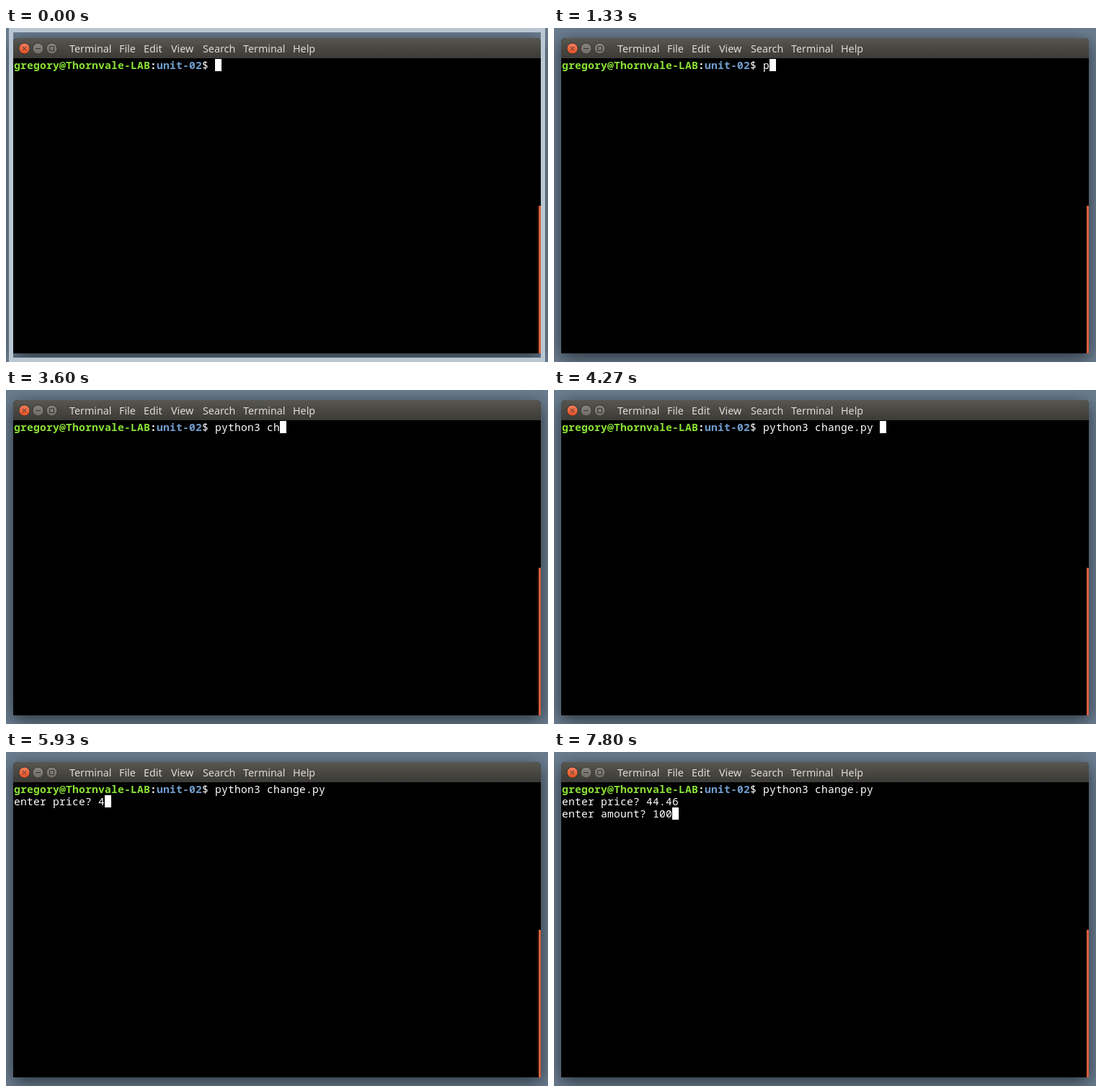
An HTML page with a canvas for the animation above (8 s loop, 752 by 464 pixels).

```html
<!DOCTYPE html>
<html lang="en">
<head>
<meta charset="utf-8">
<title>Terminal session</title>
<style>
html, body { margin: 0; width: 100%; height: 100%; overflow: hidden; background: #6a7d90; }
canvas { display: block; }
</style>
</head>
<body>
<canvas id="stage" width="752" height="464"></canvas>
<script>
const ctx = document.getElementById('stage').getContext('2d');
const LOOP = 8000, CELL = 9, LINE = 17, LEFT = 11, TOP = 43;
const MONO = '14.6px "Noto Sans Mono", monospace';

const PROMPT = [
  ['gregory@Thornvale-LAB', '#8ae234'],
  [':', '#fff'],
  ['unit-02', '#729fcf'],
];
const MENU = [['Terminal', 88], ['File', 157], ['Edit', 191], ['View', 229],
  ['Search', 273], ['Terminal', 329], ['Help', 398]];

// [time, text after the prompt, cursor hidden]
const run = 'python3 change.py ';
const price = run + '\nenter price? ';
const amount = price + '44.46\nenter amount? ';
const STEPS = [
  [0, ''], [730, '', true],
  [1330, 'p'], [1470, 'py'], [1600, 'pyt'], [1730, 'pyth'], [1870, 'pytho'], [1930, 'python'],
  [2470, 'python3'], [2600, 'python3 '], [3270, 'python3 ', true],
  [3470, 'python3 c'], [3600, 'python3 ch'], [3800, run], [4330, run, true],
  [5000, run + '\n'], [5130, price], [5730, price, true],
  [5930, price + '4'], [6130, price + '44'], [6270, price + '44.'],
  [6470, price + '44.4'], [6600, price + '44.46'],
  [7070, amount], [7530, amount + '1'], [7670, amount + '10'], [7800, amount + '100'],
];

function rect(x, y, w, h, fill) {
  ctx.fillStyle = fill;
  ctx.fillRect(x, y, w, h);
}

function gradient(y0, y1, ...colors) {
  const g = ctx.createLinearGradient(0, y0, 0, y1);
  colors.forEach((c, i) => g.addColorStop(i / (colors.length - 1), c));
  return g;
}

// Desktop with the window's soft shadow
function desktop() {
  rect(0, 0, 752, 464, '#6a7d90');
  ctx.save();
  ctx.shadowColor = 'rgba(0, 0, 0, .6)';
  ctx.shadowBlur = 24;
  ctx.shadowOffsetY = 6;
  ctx.beginPath();
  ctx.roundRect(10, 14, 732, 438, [6, 6, 0, 0]);
  ctx.fillStyle = '#000';
  ctx.fill();
  ctx.restore();
}

// Selection frame around the window, fading away at the start
function frame(t) {
  const p = Math.min(1, Math.max(0, (t - 70) / 530));
  ctx.globalAlpha = 1 - p * p * (3 - 2 * p);
  ctx.strokeStyle = '#b9c7d3';
  ctx.lineWidth = 6;
  ctx.strokeRect(7, 3, 738, 458);
  ctx.globalAlpha = 1;
}

function button(x, fill, icon) {
  ctx.beginPath();
  ctx.arc(x, 28.5, 7.6, 0, 7);
  ctx.fillStyle = fill;
  ctx.fill();
  ctx.lineWidth = 1;
  ctx.strokeStyle = '#33322e';
  ctx.stroke();
  ctx.stroke(new Path2D(icon));
}

function titleBar() {
  ctx.beginPath();
  ctx.roundRect(10, 14, 732, 28, [6, 6, 0, 0]);
  ctx.fillStyle = gradient(14, 42, '#585751', '#484741', '#3c3b37');
  ctx.fill();
  button(25.5, gradient(20, 37, '#f58463', '#df4a1c'), 'M23 26l5 5M28 26l-5 5');
  const grey = gradient(20, 37, '#888680', '#6c6a62');
  button(44.5, grey, 'M41 28.5h7');
  button(63.5, grey, 'M60.5 25.5h6v6h-6z');
  ctx.font = '14.3px "Noto Sans", sans-serif';
  ctx.fillStyle = '#dfdbd2';
  for (const [label, x] of MENU) ctx.fillText(label, x, 34);
}

function cells(text, col, row, color) {
  ctx.fillStyle = color;
  [...text].forEach((ch, i) => ctx.fillText(ch, LEFT + (col + i) * CELL, TOP + row * LINE + 14));
}

function shell(text, hidden) {
  rect(10, 42, 732, 410, '#000');
  rect(739, 247, 3, 205, '#d95f3c');
  let col = 0;
  ctx.font = 'bold ' + MONO;
  for (const [part, color] of PROMPT) {
    cells(part, col, 0, color);
    col += part.length;
  }
  ctx.font = MONO;
  const lines = ('$ ' + text).split('\n');
  lines.forEach((line, row) => cells(line, row ? 0 : col, row, '#fff'));
  const last = lines.length - 1;
  const end = lines[last].length + (last ? 0 : col);
  if (!hidden) rect(LEFT + end * CELL, TOP + last * LINE, CELL, LINE, '#fff');
}

function draw(now) {
  const t = now % LOOP;
  const [, text, hidden] = STEPS.findLast(step => step[0] <= t);
  desktop();
  frame(t);
  titleBar();
  shell(text, hidden);
  requestAnimationFrame(draw);
}
draw(0);
</script>
</body>
</html>
```
